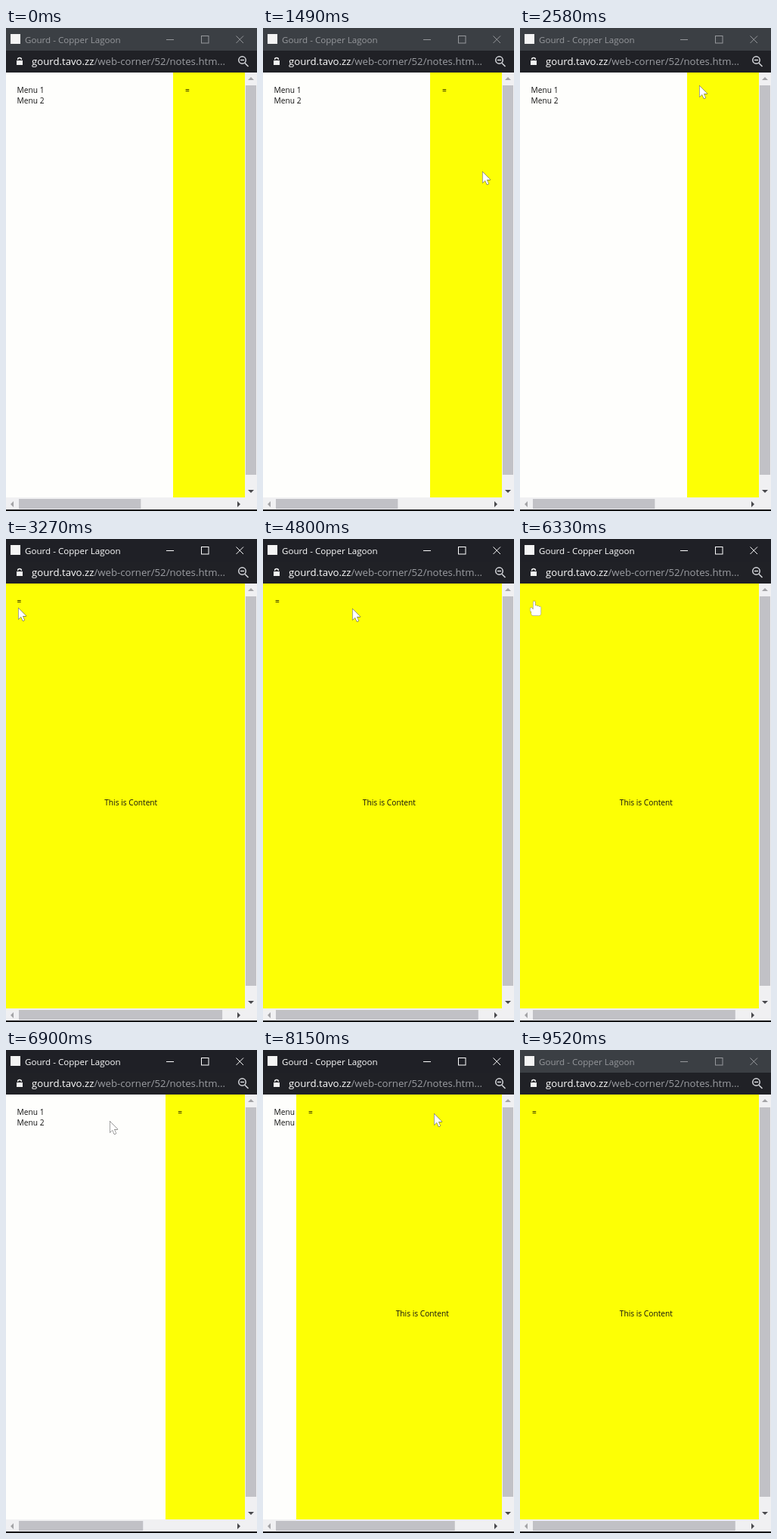
Recreate the animation shown at these times as an HTML page with a canvas. Size 332 by 640 pixels, loop 9950 ms.

```html
<!DOCTYPE html>
<html lang="en">
<head>
<meta charset="utf-8">
<title>Drawer demo</title>
<style>
  html, body { margin: 0; width: 100%; height: 100%; overflow: hidden; background: #000; }
  canvas { display: block; width: 100vw; height: 100vh; }
</style>
</head>
<body>
<canvas id="stage"></canvas>
<script>
const W = 332, H = 640, LOOP = 9950;
const OPEN = 221;
const VIEW = { top: 59, right: 316, bottom: 622 };
const FONT = '"Open Sans", "Noto Sans", sans-serif';

const canvas = document.getElementById('stage');
const dpr = window.devicePixelRatio || 1;
canvas.width = W * dpr;
canvas.height = H * dpr;
const ctx = canvas.getContext('2d');

// The drawer starts open; every click toggles it
const clicks = [2820, 6700, 8000];
const focus = { from: 2720, to: 9520 };

// The pointer rests between glides
const enter = { at: 1350, x: 307, y: 333 };
const leave = 8420;
const glides = [
  { at: 1350, ms: 140, x: 290, y: 190 },
  { at: 1690, ms: 720, x: 237, y: 76 },
  { at: 2880, ms: 380, x: 16, y: 91 },
  { at: 4120, ms: 300, x: 118, y: 92 },
  { at: 4800, ms: 150, x: 8, y: 66 },
  { at: 5160, ms: 740, x: 13, y: 82 },
  { at: 6700, ms: 200, x: 137, y: 94 },
  { at: 6940, ms: 890, x: 226, y: 84 },
  { at: 8190, ms: 230, x: 309, y: 48 }
];

const mix = (a, b, k) => a + (b - a) * k;
const clamp = k => Math.min(1, Math.max(0, k));
const smooth = k => k * k * (3 - 2 * k);

// Remaining share of a damped spring after s seconds
function spring(s) {
  const decay = 11, freq = 10.45;
  return Math.exp(-decay * s) * (Math.cos(freq * s) + decay / freq * Math.sin(freq * s));
}

function drawerX(t) {
  const count = clicks.filter(c => c <= t).length;
  if (!count) return OPEN;
  const left = spring((t - clicks[count - 1]) / 1000);
  return OPEN * (count % 2 ? left : 1 - left);
}

function pointerAt(t) {
  if (t < enter.at || t >= leave) return null;
  let { x, y } = enter;
  for (const g of glides) {
    const k = smooth(clamp((t - g.at) / g.ms));
    x = mix(x, g.x, k);
    y = mix(y, g.y, k);
  }
  return { x: Math.round(x), y: Math.round(y) };
}

const overButton = (p, x) => p && p.x > x + 3 && p.x < x + 25 && p.y > 77 && p.y < 91;

function box(x, y, w, h, color) {
  ctx.fillStyle = color;
  ctx.fillRect(x, y, w, h);
}

function text(str, x, y, size, color) {
  ctx.font = `${size}px ${FONT}`;
  ctx.fillStyle = color;
  ctx.fillText(str, x, y);
  return ctx.measureText(str).width;
}

function line(x0, y0, x1, y1) {
  ctx.beginPath();
  ctx.moveTo(x0, y0);
  ctx.lineTo(x1, y1);
  ctx.stroke();
}

function pen(color, width) {
  ctx.strokeStyle = color;
  ctx.lineWidth = width;
}

// Scroll button triangle, turned by quarter turns from "up"
function triangle(x, y, turns, color) {
  ctx.save();
  ctx.translate(x, y);
  ctx.rotate(turns * Math.PI / 2);
  ctx.beginPath();
  ctx.moveTo(-4, 2);
  ctx.lineTo(4, 2);
  ctx.lineTo(0, -2);
  ctx.fillStyle = color;
  ctx.fill();
  ctx.restore();
}

function titleBar(active) {
  const color = active ? '#fff' : '#96989c';
  box(0, 0, W, 30, active ? '#1f2026' : '#3b3f44');
  box(6, 8, 13, 13, '#f4f4f4');
  text('Gourd - Copper Lagoon', 25, 19.5, 11.6, color);
  pen(color, 1);
  line(212, 15.5, 222, 15.5);
  ctx.strokeRect(258.5, 10.5, 9.5, 9.5);
  line(304.5, 10.5, 314, 20);
  line(314, 10.5, 304.5, 20);
}

function addressBar() {
  box(0, 30, W, VIEW.top - 30, '#202126');
  box(14, 43, 8, 6, '#f2f2f2');
  pen('#f2f2f2', 1.3);
  ctx.beginPath();
  ctx.arc(18, 42, 2.5, Math.PI, 0);
  ctx.stroke();
  const w = text('gourd.tavo.zz', 34, 48.8, 13.2, '#fff');
  text('/web-corner/52/notes.htm...', 34 + w, 48.8, 13.2, '#9c9ea3');
  pen('#d8dade', 1.5);
  line(316, 46.5, 320.5, 51);
  line(310, 42.5, 315, 42.5);
  ctx.beginPath();
  ctx.arc(312.5, 42.5, 4.7, 0, Math.PI * 2);
  ctx.stroke();
}

function page(x, hover) {
  ctx.save();
  ctx.beginPath();
  ctx.rect(0, VIEW.top, VIEW.right, VIEW.bottom - VIEW.top);
  ctx.clip();
  box(0, VIEW.top, W, H, '#fefefc');
  for (const n of [1, 2]) text('Menu ' + n, 14.6, 72 + 14 * n, 10.2, '#111');
  box(Math.round(x), VIEW.top, W + OPEN, H, '#fdff05');
  ctx.globalAlpha = hover ? 0.1 : 1;
  text('=', x + 16.1, 86, 10.2, '#000');
  ctx.globalAlpha = 1;
  text('This is Content', x + 131.8, 353.4, 10.2, '#111');
  ctx.restore();
}

function scrollbars(x) {
  const track = '#f0f0f2', thumb = '#c1c1c6', dim = '#a3a3a6', dark = '#48484c';
  box(VIEW.right, VIEW.top, W - VIEW.right, H, track);
  box(0, VIEW.bottom, W, H, track);
  box(317, 76, 14, 516, thumb);
  box(17, 624, 283 * 317 / (335 + x), 13, thumb);
  triangle(324, 67, 0, dim);
  triangle(324, 614, 2, dark);
  triangle(8, 631, 3, dim);
  triangle(308, 631, 1, dark);
  box(0, 638, W, 2, '#101014');
}

const arrow = new Path2D('M.5.5V15.2L3.9 11.9 6.3 17.6 8.5 16.6 6.1 11.1H10.7Z');

// Index finger, three knuckles, thumb and palm
const hand = new Path2D();
for (let i = 0; i < 4; i++) {
  const top = i ? 5.4 + i * 0.7 : 0.5;
  hand.roundRect(4.5 + i * 2.5, top, 2.6, 14 - top, 1.3);
}
hand.roundRect(0.5, 9, 3, 5, 1.5);
hand.roundRect(2, 11, 12.6, 8.5, 3);

function pointer(p, hover) {
  const shape = hover ? hand : arrow;
  ctx.save();
  ctx.translate(p.x, p.y);
  pen(hover ? '#777' : '#444', 1);
  ctx.stroke(shape);
  ctx.fillStyle = '#fff';
  ctx.fill(shape);
  ctx.restore();
}

function draw(t) {
  const x = drawerX(t);
  const p = pointerAt(t);
  const hover = overButton(p, x);
  ctx.setTransform(dpr, 0, 0, dpr, 0, 0);
  titleBar(t >= focus.from && t < focus.to);
  addressBar();
  page(x, hover);
  scrollbars(x);
  if (p) pointer(p, hover);
}

const begin = performance.now();
function tick() {
  draw((performance.now() - begin) % LOOP);
  requestAnimationFrame(tick);
}
tick();
</script>
</body>
</html>
```
